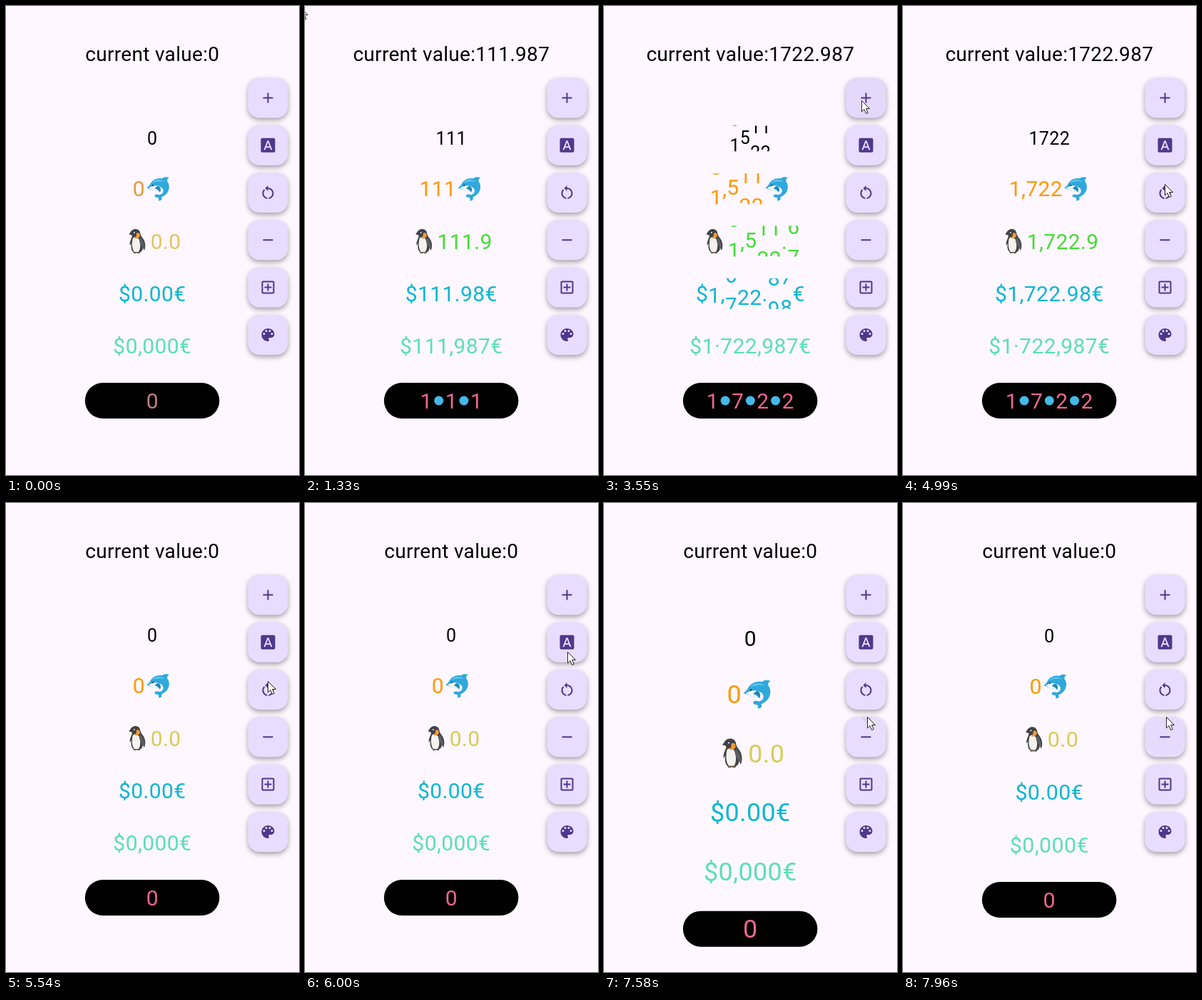
These frames come from a looping animation (411 px wide and 656 px high, 8 s). An HTML page with a canvas:

```html
<!DOCTYPE html>
<html lang="en">
<head>
<meta charset="utf-8">
<title>Digit counters</title>
<style>
html, body { margin: 0; width: 100%; height: 100%; overflow: hidden; background: #fef7ff; }
canvas { display: block; width: 411px; height: 656px; }
</style>
</head>
<body>
<canvas id="stage"></canvas>
<script>
const W = 411, H = 656, LOOP = 8000, MID = 205.3;
const FONT = 'Roboto, "Noto Sans", sans-serif';
const canvas = document.getElementById('stage');
const ctx = canvas.getContext('2d');
const dpr = window.devicePixelRatio || 1;
canvas.width = W * dpr;
canvas.height = H * dpr;

// D dolphin, P penguin, | round separator
const STATES = [
  { at: 0, title: '0', rows: ['0', '0D', 'P0.0', '$0.00€', '$0,000€', '0'] },
  { at: 500, title: '111.987', rows: ['111', '111D', 'P111.9', '$111.98€', '$111,987€', '1|1|1'] },
  { at: 3225, title: '1722.987', rows: ['1722', '1,722D', 'P1,722.9', '$1,722.98€', '$1·722,987€', '1|7|2|2'] },
  { at: 5020, title: '0', rows: ['0', '0D', 'P0.0', '$0.00€', '$0,000€', '0'] }
];

const ROWS = [
  { y: 185.3, size: 25, roll: 500, color: '#000' },
  { y: 255.8, size: 30, roll: 500, color: '#ff9800', start: '#e39b3f' },
  { y: 329, size: 30, roll: 500, color: '#45dc36', zero: '#d8cc55', start: '#e5c45e' },
  { y: 402.3, size: 30, roll: 380, color: '#0cb6d3' },
  { y: 475.7, size: 30, roll: 300, color: '#5bdfb6' },
  { y: 552, size: 30, roll: 300, color: '#ee6690', start: '#c27f8c' }
];

const ICONS = [
  'M19 13h-6v6h-2v-6H5v-2h6V5h2v6h6z',
  'M9.93 13.5h4.14L12 7.98zM20 2H4c-1.1 0-2 .9-2 2v16c0 1.1.9 2 2 2h16c1.1 0 2-.9 2-2V4c0-1.1-.9-2-2-2zm-4.05 16.5l-1.14-3H9.17l-1.12 3H5.96l5.11-13h1.86l5.11 13h-2.09z',
  'M12 5V2L8 6l4 4V7c3.31 0 6 2.69 6 6 0 2.97-2.17 5.43-5 5.91v2.02c3.95-.49 7-3.85 7-7.93 0-4.42-3.58-8-8-8zM6 13c0-1.65.67-3.15 1.76-4.24L6.34 7.34C4.9 8.79 4 10.79 4 13c0 4.08 3.05 7.44 7 7.93v-2.02c-2.83-.48-5-2.94-5-5.91z',
  'M19 13H5v-2h14z',
  'M19 3H5c-1.11 0-2 .9-2 2v14c0 1.1.89 2 2 2h14c1.1 0 2-.9 2-2V5c0-1.1-.9-2-2-2zm0 16H5V5h14v14zm-8-2h2v-4h4v-2h-4V7h-2v4H7v2h4z',
  'M12 3c-4.97 0-9 4.03-9 9s4.03 9 9 9c.83 0 1.5-.67 1.5-1.5 0-.39-.15-.74-.39-1.01-.23-.26-.38-.61-.38-.99 0-.83.67-1.5 1.5-1.5H16c2.76 0 5-2.24 5-5 0-4.42-4.03-8-9-8z'
].map(d => new Path2D(d));
const PAINT_DOTS = [[6.5, 10.5], [9.5, 6.5], [14.5, 6.5], [17.5, 10.5]];

// press time, release time, button, x, y
const PRESSES = [
  [2880, 3220, 0, 361, 131], [4990, 5060, 2, 367, 249],
  [6200, 6270, 1, 368, 205], [7500, 7570, 3, 369, 299]
];

// time, x, y of the pointer tip
const POINTER = [
  [1330, -8, 0], [1500, 70, 150], [1720, 230, 350], [1860, 335, 393], [2120, 359, 210],
  [2160, 359, 208], [2210, 361, 198], [2370, 361, 198], [2720, 361, 132], [3700, 361, 132],
  [4020, 372, 218], [4060, 372, 220], [4400, 371, 257], [4750, 367, 249], [5830, 367, 249],
  [6000, 368, 208], [6200, 368, 204], [6670, 368, 204], [6900, 370, 186], [7160, 374, 230],
  [7420, 369, 299], [8000, 369, 299]
];

const clamp = v => Math.max(0, Math.min(1, v));
const smooth = v => { v = clamp(v); return v * v * (3 - 2 * v); };
const buttonTop = i => 100.4 + 66.3 * i;

const ARROW = new Path2D('M.5 .5V15.8L4 12.5 6.6 18.5 9.2 17.4 6.7 11.5H11.5z');
const DOLPHIN = {
  body: new Path2D('M-16.5-1C-15-3-13-4-12-6C-9-13-1-16 5-14.5C8-17 12-17 15-15.5C12-14 12-12 12.5-10C16-6 16 3 10 8C8 10 5 11 4 12C6 15 3 17 0 16.5C1 14 0 12-2 12C-6 12-6 9-4 8C-1 7 1 9 3 8C5 6 5 3 2 2C-1 2-4 4-7 3C-10 1-13 0-16.5-1z'),
  belly: new Path2D('M-14-1C-10-4-3-6 2-3C8-1 8 5 4 8C5 5 4 3 2 2C-1 2-4 4-7 3C-10 1-12 0-14-1z'),
  fin: new Path2D('M-1-4C3-3 4 1 2 5C1 3-2 0-5 0C-4-2-3-3-1-4z'),
  shine: new Path2D('M-9-8C-5-14 3-14 9-10C4-11-4-11-9-8z')
};
const PENGUIN = {
  body: new Path2D('M-11.5-9.5C-10-11-9-15-5-16.5C-1-18 4-16 4.5-11C5-7 8-5 10-1C12 4 12 9 10 13L8 9C8 13 6 15 3 16H-4C-8 14-9 9-8 3L-10 6C-11 1-8-3-7-7C-7-9-9-9-11.5-9.5z'),
  belly: new Path2D('M-6-4C-3-7 1-6 3-2C5 4 5 11 2 15H-4C-7 11-8 4-6-4z'),
  patch: new Path2D('M-1-11C2-13 4-11 4-8C4-5 0-3-4-4C-1-6-1-8-1-11z'),
  wing: new Path2D('M5-5C8-1 11 4 10 11C6 8 3 2 3-3z')
};

function fill(path, color) {
  ctx.fillStyle = color;
  ctx.fill(path);
}

function disc(x, y, r, color) {
  ctx.fillStyle = color;
  ctx.beginPath();
  ctx.arc(x, y, r, 0, 7);
  ctx.fill();
}

function box(x, y, w, h, r) {
  ctx.beginPath();
  ctx.roundRect(x, y, w, h, r);
}

function at(x, y, scale, draw) {
  ctx.save();
  ctx.translate(x, y);
  ctx.scale(scale, scale);
  draw();
  ctx.restore();
}

function drawDolphin() {
  fill(DOLPHIN.body, '#2fa8dc');
  fill(DOLPHIN.belly, '#f3f7fa');
  fill(DOLPHIN.fin, '#2387b8');
  fill(DOLPHIN.shine, '#62c9ef');
  disc(-8, -5, 1.1, '#26353d');
}

function drawPenguin() {
  fill(PENGUIN.body, '#414347');
  fill(PENGUIN.belly, '#f5f2ee');
  fill(PENGUIN.patch, '#f59a35');
  fill(PENGUIN.wing, '#5b5d61');
  disc(-4, -12, 0.9, '#fff');
  ctx.fillStyle = '#6b5a4a';
  ctx.fillRect(-5, 15, 4, 2);
  ctx.fillRect(0, 15, 4, 2);
}

function charWidth(c, size) {
  if (c === 'D' || c === 'P') return size * 1.245 + 0.4;
  if (c === '|') return size * 0.6;
  return ctx.measureText(c).width + 0.4;
}

function drawRow(text, y, size, color, p) {
  ctx.font = size + 'px ' + FONT;
  const h = size * 1.43, base = y + size * 0.356;
  const widths = [...text].map(c => charWidth(c, size));
  let x = MID - widths.reduce((a, b) => a + b, 0) / 2;
  [...text].forEach((c, i) => {
    const w = widths[i], cx = x + w / 2;
    ctx.fillStyle = color;
    if (c === 'D') at(cx, y, size / 30, drawDolphin);
    else if (c === 'P') at(cx, y, size / 30, drawPenguin);
    else if (c === '|') disc(cx, y, 6.5, '#45b8ea');
    else if (c >= '0' && c <= '9' && p < 1) {
      const v = c * p, low = Math.floor(v);
      ctx.save();
      ctx.beginPath();
      ctx.rect(x, y - h / 2, w, h);
      ctx.clip();
      for (let d = low; d <= Math.min(low + 1, 9); d++) ctx.fillText(d, x, base + (d - v) * h);
      ctx.restore();
    } else ctx.fillText(c, x, base);
    x += w;
  });
}

function drawTitle(value, big) {
  const size = big ? 33.6 : 28;
  ctx.font = size + 'px ' + FONT;
  ctx.letterSpacing = '0.3px';
  ctx.textAlign = 'center';
  ctx.fillStyle = '#000';
  ctx.fillText('current value:' + value, MID, (big ? 71.7 : 67.6) + size * 0.345);
  ctx.textAlign = 'left';
  ctx.letterSpacing = '0px';
}

function drawCounters(t) {
  const state = STATES.filter(s => t >= s.at).pop();
  const big = t >= 6235 && t < 7540;
  const grow = smooth((t - 6235) / 500) - smooth((t - 7540) / 500);
  drawTitle(state.title, big);
  let shift = big ? 7.5 : 0;
  ROWS.forEach((row, i) => {
    const pill = i === 5;
    const extra = pill ? 0 : (i ? 9.3 : 7.3) * grow;
    const y = row.y + shift + extra / 2;
    shift += extra;
    if (pill) {
      ctx.fillStyle = '#000';
      box(110.8, y - 25, 188.6, 50, 25);
      ctx.fill();
    }
    let color = row.color;
    if (state.title === '0') color = (t < 500 && row.start) || row.zero || color;
    drawRow(state.rows[i], y, row.size * (1 + 0.2 * grow), color, smooth((t - state.at) / row.roll));
  });
}

function drawRipple(t, [down, up, , x, y]) {
  if (t < down || t > up + 450) return;
  const spread = smooth((t - up) / 250);
  const fade = 1 - clamp((t - up - 100) / 350);
  disc(x, y, 12 * clamp((t - down) / 130) + 40 * spread, `rgba(79,55,138,${0.08 * fade})`);
}

function drawButtons(t) {
  ICONS.forEach((icon, i) => {
    const y = buttonTop(i);
    ctx.save();
    ctx.shadowColor = 'rgba(0,0,0,.36)';
    ctx.shadowBlur = 7 * dpr;
    ctx.shadowOffsetY = 3 * dpr;
    ctx.fillStyle = '#e8ddfe';
    box(339.5, y, 56, 56, 16);
    ctx.fill();
    ctx.restore();

    ctx.save();
    box(339.5, y, 56, 56, 16);
    ctx.clip();
    PRESSES.filter(p => p[2] === i).forEach(p => drawRipple(t, p));
    ctx.restore();

    at(355.5, y + 16, 1, () => {
      ctx.fillStyle = '#4f378a';
      ctx.fill(icon, 'evenodd');
      if (i === 5) PAINT_DOTS.forEach(([x, dy]) => disc(x, dy, 1.5, '#e8ddfe'));
    });
  });
}

function drawPointer(t) {
  const n = POINTER.findIndex(p => p[0] > t);
  if (n < 1) return;
  const [t0, x0, y0] = POINTER[n - 1], [t1, x1, y1] = POINTER[n];
  const p = (t - t0) / (t1 - t0);
  at(x0 + (x1 - x0) * p, y0 + (y1 - y0) * p, 1, () => {
    fill(ARROW, '#fff');
    ctx.strokeStyle = '#222';
    ctx.lineWidth = 1;
    ctx.stroke(ARROW);
  });
}

function frame(now) {
  const t = now % LOOP;
  ctx.setTransform(dpr, 0, 0, dpr, 0, 0);
  ctx.fillStyle = '#fef7ff';
  ctx.fillRect(0, 0, W, H);
  drawCounters(t);
  drawButtons(t);
  drawPointer(t);
  requestAnimationFrame(frame);
}
requestAnimationFrame(frame);
</script>
</body>
</html>
```
